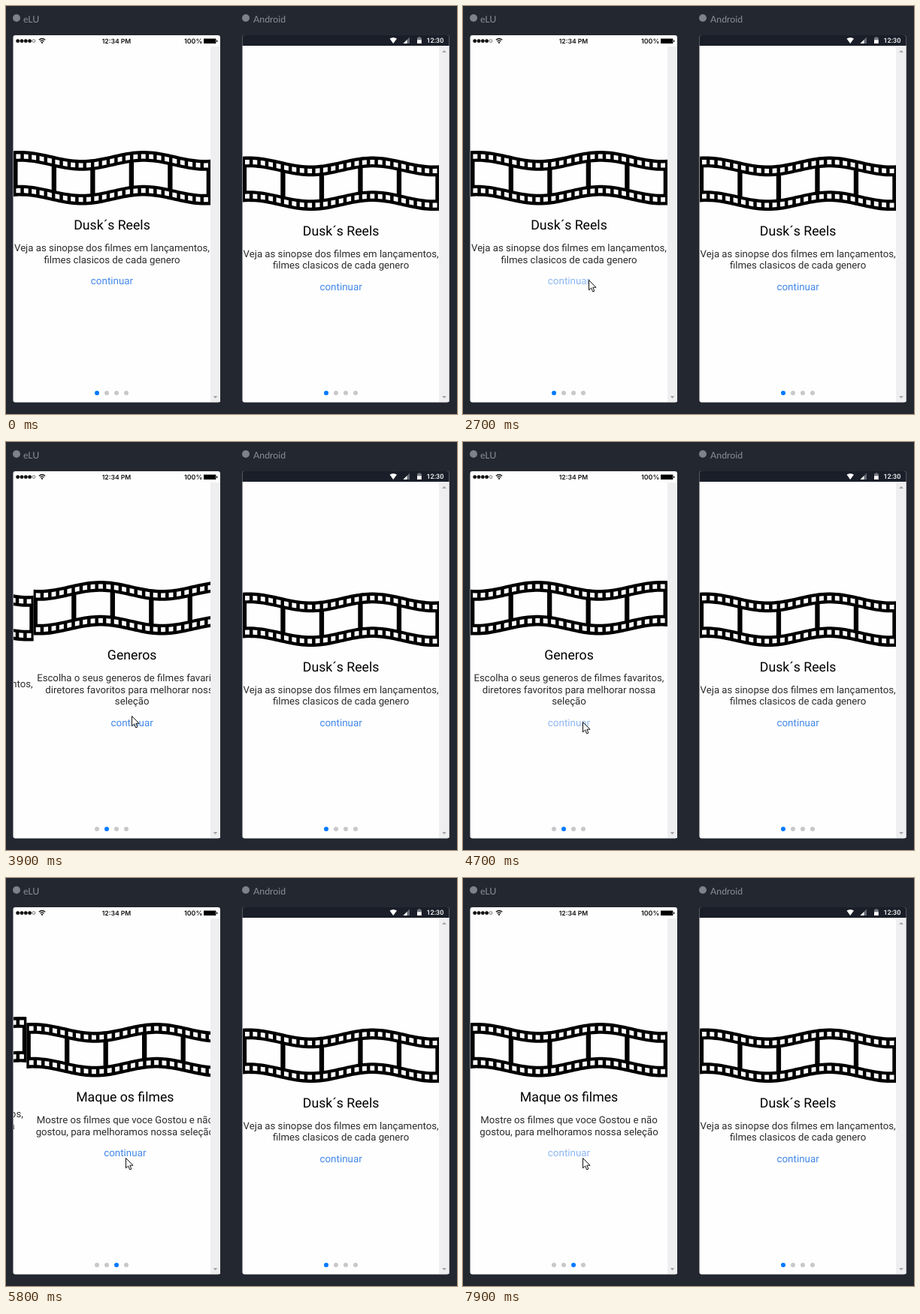
These frames come from a looping animation (600x544 px, 8000 ms). An HTML page:

```html
<!DOCTYPE html>
<html lang="pt">
<head>
<meta charset="utf-8">
<title>Slides preview</title>
<style>
  html, body { margin: 0; height: 100%; overflow: hidden; background: #232730; }
  svg { display: block; }
  text { font-family: Roboto, sans-serif; text-rendering: geometricPrecision; }
  .title { font-size: 17.7px; fill: #000; }
  .body { font-size: 13.2px; fill: #2b2b2b; }
  .link { font-size: 13.4px; fill: #4388e8; }
  .mid { text-anchor: middle; }
  .label { font: 12.3px Lato, sans-serif; fill: #8b8f98; }
  .clock { font: 600 8.6px Inter, sans-serif; fill: #111; }
</style>
</head>
<body>
<svg width="600" height="544" viewBox="0 0 600 544">
  <defs>
    <path id="film" fill-rule="evenodd"/>
    <path id="arrow" d="M0 -1.8L2.8 1.5H-2.8Z" fill="#a3a3a3"/>
  </defs>
  <rect width="600" height="544" fill="#232730"/>

  <g fill="#7d828c"><circle cx="14" cy="16" r="5"/><circle cx="319" cy="16" r="5"/></g>
  <text class="label" x="23" y="21.5">eLU</text>
  <text class="label" x="329" y="21.5">Android</text>

  <rect x="9.5" y="39" width="275.5" height="489.5" rx="3" fill="#fefefe"/>
  <rect x="272" y="54" width="13" height="474" fill="#efeef0"/>
  <use href="#arrow" transform="translate(278.5 521.5) scale(1 -1)"/>
  <svg x="10" y="54" width="262" height="474" viewBox="10 54 262 474"><g id="left"></g></svg>
  <g id="leftDots"></g>
  <g id="bars"></g>
  <g fill="none" stroke="#111" stroke-width="1.3">
    <path d="M43.8 45.2Q48 41.8 52.2 45.2M45.5 47.2Q48 45.2 50.5 47.2"/>
  </g>
  <circle cx="48" cy="48.8" r="1.1"/>
  <text class="clock mid" x="147" y="49.6">12:34 PM</text>
  <text class="clock" x="237" y="49.6" style="font-size:8.9px">100%</text>
  <path d="M263 43.5h16.3v6.5h-16.3zM280 45.5h1.3v2.6h-1.3z"/>

  <rect x="314.5" y="39" width="275" height="489.5" rx="3" fill="#fefefe"/>
  <rect x="576" y="53" width="13.5" height="475" fill="#efeef0"/>
  <path d="M314.5 53V42q0-3 3-3h269q3 0 3 3v11z" fill="#1a1e29"/>
  <g fill="#fff">
    <path d="M510.5 43.6Q515.2 40.6 520 43.6L515.2 50Z"/>
    <path d="M537 41.5V50H528.5Z" fill="#666a74"/>
    <path d="M533.5 45V50H528.5Z"/>
    <path d="M548.6 41.2h2.6v1h1.6v3.3h-5.8v-3.3h1.6z" fill="#777b84"/>
    <path d="M547 45.2h5.8v4.8h-5.8z"/>
    <text x="559.5" y="49.3" style="font-size:9px;font-weight:500">12:30</text>
  </g>
  <use href="#arrow" x="583" y="60.5"/>
  <use href="#arrow" transform="translate(583 521.5) scale(1 -1)"/>
  <svg x="315" y="54" width="261" height="474" viewBox="315 54 261 474"><g id="right"></g></svg>
  <g id="rightDots"></g>

  <path id="cursor" d="M.5 .5V13.8L3.6 10.9 5.7 15.9 7.9 15 5.8 10.2H10Z" fill="#fff" stroke="#111"/>
</svg>
<script>
const $ = id => document.getElementById(id);
const LOOP = 8000, STEP = 100, PAGE = 262;

const slides = [
  ['Dusk´s Reels', 'Veja as sinopse dos filmes em lançamentos,', 'filmes clasicos de cada genero'],
  ['Generos', 'Escolha o seus generos de filmes favaritos,', 'diretores favoritos para melhorar nossa', 'seleção'],
  ['Maque os filmes', 'Mostre os filmes que voce Gostou e não', 'gostou, para melhoramos nossa seleção'],
];
const pressAt = [2700, 4700, 7900];
const turns = [{ show: 3400, start: 3280 }, { show: 5100, start: 5115 }];

// Cursor runs: linear between [time, x, y] points, hidden outside a run
const runs = [
  [[600, 192, 393], [700, 372, 428], [1000, 372, 428]],
  [[1600, 360, 277], [1700, 430, 320], [1800, 430, 320], [1900, 460, 310], [2400, 200, 345],
   [2600, 167, 365], [4300, 167, 365], [4600, 159, 373], [LOOP, 159, 373]],
];

// Wavy strip piece from u0 to u1, between depths a and b
const wave = u => 6 - 6 * Math.cos((u - 9) / 164 * 2 * Math.PI);
function strip(u0, u1, a, b) {
  const n = Math.ceil((u1 - u0) / 4), top = [], bottom = [];
  for (let i = 0; i <= n; i++) {
    const u = u0 + (u1 - u0) * i / n;
    top.push(`${u.toFixed(1)} ${(wave(u) + a).toFixed(2)}`);
    bottom.unshift(`${u.toFixed(1)} ${(wave(u) + b).toFixed(2)}`);
  }
  return `M${[...top, ...bottom].join('L')}Z`;
}
let film = strip(0, PAGE, 0, 60.6);
for (let i = 0; i < 5; i++) film += strip(5.5 + 51.5 * i, 50.7 + 51.5 * i, 14.8, 45.8);
for (let i = 0; i < 25; i++) {
  const u = 3.4 + 10.4 * i;
  film += strip(u, u + 5.9, 4.4, 10.6) + strip(u, u + 5.9, 50, 56.2);
}
$('film').setAttribute('d', film);

function slide(i) {
  const [title, ...lines] = slides[i];
  const y = lines.length > 2 ? -8 : 0;
  const text = (kind, base, s) => `<text class="mid ${kind}" x="131" y="${base}">${s}</text>`;
  return `<g transform="translate(${i * PAGE} ${y})">
    <use href="#film" transform="translate(${i % 2 ? PAGE : 0} 193) scale(${i % 2 ? -1 : 1} 1)"/>
    ${text('title', 298, title)}
    ${lines.map((s, k) => text('body', 327 + 15.6 * k, s)).join('')}
    ${text('link', 340 + 15.6 * lines.length, 'continuar')}</g>`;
}
const dots = x => [0, 1, 2, 3].map(i =>
  `<circle cx="${x + 13 * i}" cy="516" r="3" fill="${i ? '#c8c8cc' : '#007aff'}"/>`).join('');

$('left').innerHTML = slides.map((_, i) => slide(i)).join('');
$('right').innerHTML = slide(0);
$('right').setAttribute('transform', 'translate(314.6 7.5)');
$('leftDots').innerHTML = dots(121);
$('rightDots').innerHTML = dots(426);
$('bars').innerHTML = [0, 1, 2, 3, 4].map(i =>
  `<circle cx="${15.7 + 5.3 * i}" cy="46.6" r="${i < 4 ? 2.2 : 1.9}" stroke="#111" stroke-width=".6" fill="${i < 4 ? '#111' : 'none'}"/>`).join('');
const links = $('left').querySelectorAll('.link');

// cubic-bezier(.25, .1, .25, 1)
function ease(p) {
  if (p <= 0 || p >= 1) return p <= 0 ? 0 : 1;
  const bez = (a, b, s) => 3 * a * s * (1 - s) ** 2 + 3 * b * s * s * (1 - s) + s ** 3;
  let lo = 0, hi = 1;
  for (let i = 0; i < 24; i++) {
    const mid = (lo + hi) / 2;
    if (bez(.25, .25, mid) < p) lo = mid; else hi = mid;
  }
  return bez(.1, 1, lo);
}

function cursorAt(t) {
  const run = runs.find(r => t >= r[0][0] && t < r[r.length - 1][0]);
  if (!run) return null;
  const k = run.findIndex(p => p[0] > t);
  const [t0, x0, y0] = run[k - 1], [t1, x1, y1] = run[k];
  const f = (t - t0) / (t1 - t0);
  return [x0 + (x1 - x0) * f, y0 + (y1 - y0) * f];
}

function draw(now) {
  const t = Math.floor(now % LOOP / STEP) * STEP;
  let page = 0, active = 0;
  for (const { show, start } of turns) {
    if (t < show) continue;
    page += ease((t - start) / 1000);
    active++;
  }
  $('left').setAttribute('transform', `translate(${(10 - page * PAGE).toFixed(2)} 0)`);
  [...$('leftDots').children].forEach((dot, i) =>
    dot.setAttribute('fill', i === active ? '#007aff' : '#c8c8cc'));
  links.forEach((link, i) => link.setAttribute('opacity', t >= pressAt[i] ? .6 : 1));

  const at = cursorAt(t);
  $('cursor').setAttribute('visibility', at ? 'visible' : 'hidden');
  if (at) $('cursor').setAttribute('transform', `translate(${at.map(Math.round)})`);
}

const began = performance.now();
(function tick() {
  draw(performance.now() - began);
  requestAnimationFrame(tick);
})();
</script>
</body>
</html>
```
